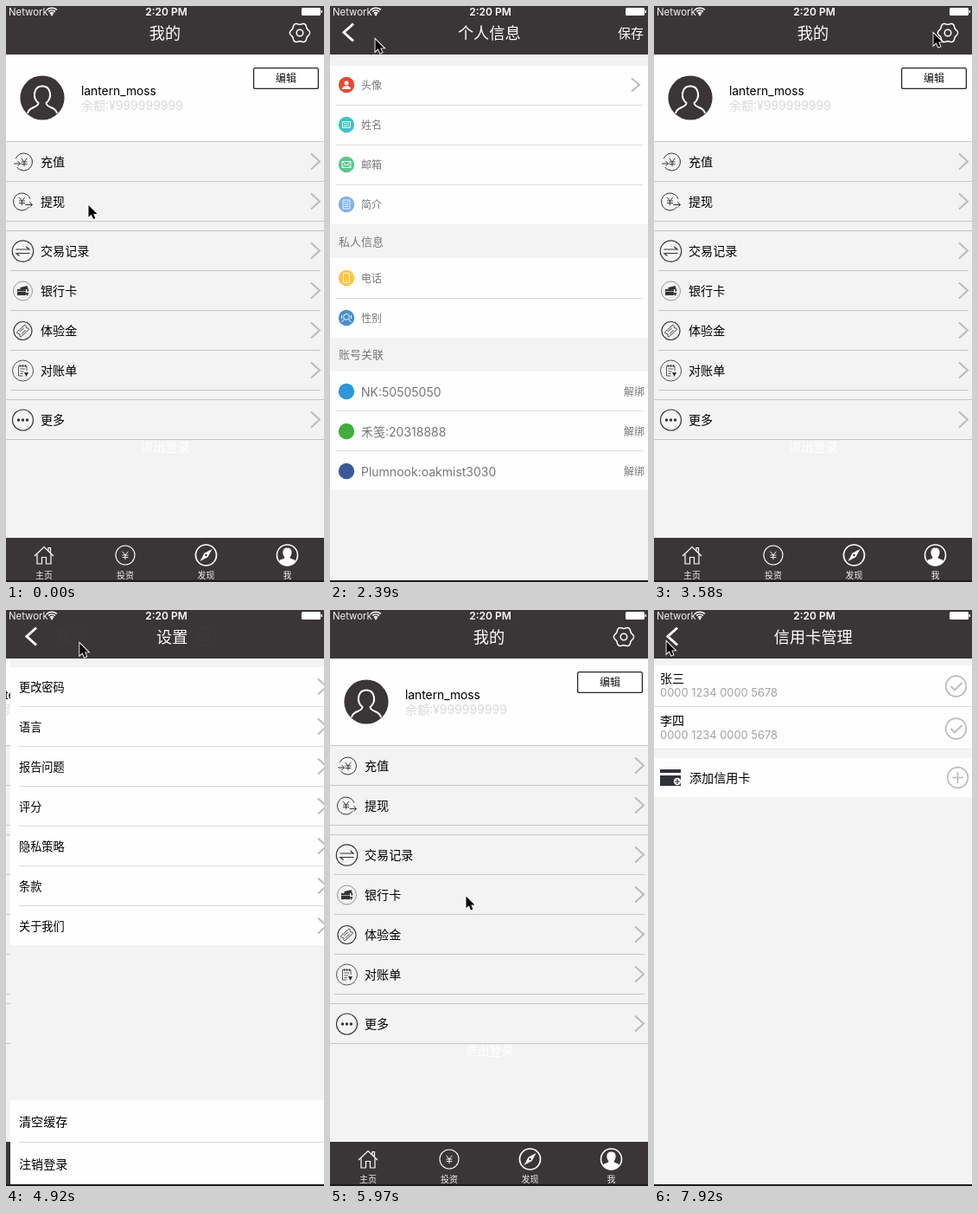
Write an HTML page with a canvas that moves like this. It is 368x665 px and loops after 8000 ms.

```html
<!DOCTYPE html>
<html lang="zh-CN">
<head>
<meta charset="utf-8">
<title>账户页面演示</title>
<style>
html, body { margin: 0; width: 100%; height: 100%; overflow: hidden; background: #f3f3f3; }
canvas { display: block; width: 368px; height: 665px; }
</style>
</head>
<body>
<canvas id="stage"></canvas>
<script>
const W = 368, H = 665, LOOP = 8000;
const DARK = '#3a3536', GREY = '#f3f3f3', ARROW = '#bbb';
const FONT = 'Inter, "Noto Sans CJK SC", "Noto Sans CJK", sans-serif';
const canvas = document.getElementById('stage');
const ctx = canvas.getContext('2d');
const ratio = window.devicePixelRatio || 1;
canvas.width = W * ratio;
canvas.height = H * ratio;

function rect(x, y, w, h, color) {
  ctx.fillStyle = color;
  ctx.fillRect(x, y, w, h);
}
function rule(x1, x2, y, color = '#c6c6c6') { rect(x1, y, x2 - x1, 1, color); }
function line(d, color, width = 1) {
  ctx.strokeStyle = color;
  ctx.lineWidth = width;
  ctx.stroke(new Path2D(d));
}
function fill(d, color) {
  ctx.fillStyle = color;
  ctx.fill(new Path2D(d));
}
function disc(x, y, r, color) {
  ctx.beginPath();
  ctx.arc(x, y, r, 0, 7);
  ctx.fillStyle = color;
  ctx.fill();
}
function ring(x, y, r, color, width = 1, from = 0, to = Math.PI * 2) {
  ctx.beginPath();
  ctx.arc(x, y, r, from, to);
  ctx.strokeStyle = color;
  ctx.lineWidth = width;
  ctx.stroke();
}
// y is the middle of the glyphs
function text(s, x, y, size, color, align = 'left', weight = 400) {
  ctx.font = `${weight} ${size}px ${FONT}`;
  ctx.textAlign = align;
  ctx.fillStyle = color;
  ctx.fillText(s, x, y + size * 0.37);
}
function at(x, y, draw) {
  ctx.save();
  ctx.translate(x, y);
  draw();
  ctx.restore();
}
function chevron(x, y, w = 11, h = 9) {
  line(`M${x + 1} ${y - h}L${x + w} ${y}L${x + 1} ${y + h}`, ARROW, 2);
}
function yen(color, s = 1) {
  ctx.save();
  ctx.scale(s, s);
  line('M-4 -5L0 0L4 -5M0 0V6M-4 0H4M-4 3H4', color, 1.1);
  ctx.restore();
}

const INK = '#333';
const homeRows = [
  ['充值', 180, () => {
    ring(1, 0, 10, INK, 1, -2.75, 2.5);
    at(1.5, 0, () => yen(INK, 0.85));
    line('M-10.5 2H-3M-6 -1L-3 2L-6 5', INK);
  }],
  ['提现', 226, () => {
    ring(-1, 0, 10, INK, 1, 0.65, 5.95);
    at(-1, -1, () => yen(INK, 0.85));
    line('M3 3.5H11M8 0.5L11 3.5L8 6.5', INK);
  }],
  ['交易记录', 283, () => {
    ring(0, 0, 12.2, INK, 1.2);
    line('M-8 -2H7.5L4 -5M8 2.5H-7.5L-4 5.5', INK, 1.2);
  }],
  ['银行卡', 329, () => {
    ring(0, 0, 11, '#888', 0.9);
    fill('M-3 -4L5 -6L7 0L5 1V-2H-3Z', INK);
    rect(-6.5, -2, 10, 7, INK);
    rule(-6.5, 3.5, 0, '#aaa');
    fill('M3 2H7L5 6Z', INK);
  }],
  ['体验金', 375, () => {
    ring(0, 0, 10.5, INK, 1.1);
    ctx.rotate(-0.75);
    line('M-6.5 -3.5H6.5V-1.2A1.2 1.2 0 0 0 6.5 1.2V3.5H-6.5V1.2A1.2 1.2 0 0 0 -6.5 -1.2ZM-3 -1.5H3M-3 1.5H3', INK, 0.9);
  }],
  ['对账单', 421, () => {
    ring(0, 0, 12, '#555', 1);
    line('M4.5 0V-5.5H-5V6H0M-3 -7V-4M0 -7V-4M3 -7V-4M-3 -2H2.5M-3 1H1M-3 3.5H0', '#444', 0.9);
    fill('M1.5 2H6.5L4 7Z', INK);
  }],
  ['更多', 478, () => {
    ring(0, 0, 12, INK, 1.2);
    for (const x of [-5, 0, 5]) disc(x, 0, 1.7, INK);
  }]
];
const tabs = [
  ['主页', 44, () => line('M-11 1L0 -9.5L11 1M5 -5V-8.5H7.5V-2.5M-8 -1V10H-2.5V2.5H2.5V10H8V-1', '#fff', 1.2)],
  ['投资', 138, () => { ring(0, 0, 11, '#fff', 1.1); yen('#fff', 0.85); }],
  ['发现', 231.5, () => {
    ring(0, 0, 12, '#fff', 1.7);
    fill('M7 -7L2 2.2L-7 7L-2 -2.2Z', '#fff');
    disc(0, 0, 1.3, DARK);
  }],
  ['我', 325.5, () => {
    ring(0, 0, 12, '#fff', 1.6);
    fill('M0 -8.5C7 -8.5 5.5 0 3 2.5C3 5 9 4 9.5 7.5A12 12 0 0 1 -9.5 7.5C-9 4 -3 5 -3 2.5C-5.5 0 -7 -8.5 0 -8.5Z', '#fff');
  }]
];

function home(t) {
  rect(0, 56, W, H - 56, GREY);
  rect(0, 56, W, 100, '#fefefe');
  disc(42, 106, 25.6, DARK);
  at(42, 106, () => line('M-17 18C-16 10 -5 12 -4.5 6C-12 0 -10 -13.5 0 -13.5S12 0 4.5 6C5 12 16 10 17 18', '#fff', 2));
  text('lantern_moss', 87, 97.5, 13.8, '#000');
  text('余额:¥999999999', 87, 114.5, 14, '#d9d9d9');

  const pressed = t >= 1635 && t < 1935;
  ctx.beginPath();
  ctx.roundRect(286.6, 71.6, 74.8, 23.8, 2);
  ctx.fillStyle = pressed ? '#c4c4c4' : '#fff';
  ctx.fill();
  ctx.strokeStyle = '#25252f';
  ctx.lineWidth = 1.3;
  ctx.stroke();
  text('编辑', 324, 84, 12, '#111', 'center', 500);

  for (const y of [156, 202, 248, 259, 454, 500]) rule(0, W, y);
  for (const y of [305, 351, 397, 443]) rule(5, 364, y);
  for (const [label, y, icon] of homeRows) {
    at(19.5, y, icon);
    text(label, 40, y, 14.1, '#000');
    chevron(352, y - 0.5);
  }
  text('退出登录', 184.5, 508.5, 14, '#fff', 'center');

  rect(0, 614, W, 51, DARK);
  for (const [label, x, icon] of tabs) {
    at(x, 634, icon);
    text(label, x, 657, 10, '#f2f2f2', 'center');
  }
}
function homeBar() {
  text('我的', 184, 31, 18.2, '#fff', 'center');
  ctx.beginPath();
  for (let i = 0; i <= 72; i++) {
    const a = i * Math.PI / 36, r = 10.6 + Math.cos(6 * a);
    ctx.lineTo(340 + r * Math.cos(a), 31 + r * Math.sin(a));
  }
  ctx.strokeStyle = '#fff';
  ctx.lineWidth = 1.5;
  ctx.stroke();
  ring(340, 31, 3.8, '#fff', 1.5);
}

const profileRows = [
  ['头像', 91, '#e6492f', () => { disc(0, -2, 2.5, '#fff'); fill('M-5 5C-5 0 5 0 5 5Z', '#fff'); }],
  ['姓名', 137, '#43c0c6', () => line('M-4.5 -3.5H4.5V3.5H-4.5ZM-3 -1.3H3M-3 1.3H3', '#fff', 0.9)],
  ['邮箱', 183, '#5bc48c', () => line('M-5 -3.5H5V3.5H-5ZL0 1L5 -3.5M-5 3.5L-1.5 0M5 3.5L1.5 0', '#fff', 0.9)],
  ['简介', 229, '#7fafe9', () => line('M-4 -5H4V5H-4ZM-2.5 -2.5H0M-2.5 0H2.5M-2.5 2.5H2.5M1.5 -3.5V-1.5', '#fff', 0.9)],
  ['电话', 314, '#fcc44c', () => line('M-3.5 -5.5H3.5V5.5H-3.5ZM-1 4H1', '#fff', 0.9)],
  ['性别', 360, '#4a8fcc', () => { ring(0, -1, 3.4, '#fff', 0.9); line('M-5.5 5L-2.5 1.5M5.5 5L2.5 1.5M-5.5 -3V1M5.5 -3V1', '#fff', 0.9); }],
  ['NK:50505050', 445, '#2e97d7'],
  ['禾笺:20318888', 491, '#40ad3c'],
  ['Plumnook:oakmist3030', 537, '#3b5998']
];
function profile() {
  rect(-3, 56, W + 3, H - 56, GREY);
  for (const [y, h] of [[69, 183], [291, 92], [422, 137]]) rect(-3, y, W + 3, h, '#fefefe');
  for (const y of [114, 160, 206, 337, 467, 513]) rule(7, 362, y, '#dcdcdc');
  text('私人信息', 10, 272, 13, '#777');
  text('账号关联', 10, 402.5, 13, '#777');
  for (const [label, y, color, icon] of profileRows) {
    disc(19, y, 9.2, color);
    if (icon) at(19, y, icon);
    text(label, 36, y + 0.5, icon ? 12 : 14, '#777');
    if (!icon) text('解绑', 364, y + 0.5, 12, '#777', 'right');
  }
  chevron(348, 91, 10, 7.5);
}

function settings() {
  rect(-3, 56, W + 3, H - 56, GREY);
  rect(-3, 66, W + 3, 321, '#fefefe');
  rect(-3, 566, W + 3, 99, '#fefefe');
  ['更改密码', '语言', '报告问题', '评分', '隐私策略', '条款', '关于我们'].forEach((label, i) => {
    const y = 89 + 46 * i;
    text(label, 7, y, 13.2, '#000');
    chevron(352, y - 0.5);
    if (i < 6) rule(7, W, y + 22, '#dcdcdc');
  });
  text('清空缓存', 7, 591, 14.1, '#000');
  rule(7, W, 614, '#dcdcdc');
  text('注销登录', 7, 640, 14.1, '#000');
}

function cards() {
  rect(-3, 56, W + 3, H - 56, '#f4f4f4');
  rect(-3, 64, W + 3, 96, '#fefefe');
  rect(-3, 171, W + 3, 45, '#fefefe');
  rule(0, W, 111, '#dedede');
  rule(0, W, 160, '#e4e4e4');
  [['张三', 79], ['李四', 128]].forEach(([name, y]) => {
    text(name, 7, y, 14, '#000');
    text('0000 1234 0000 5678', 7, y + 16.5, 12.9, '#a2a2a2');
    ring(349.5, y + 9, 11.8, ARROW, 1.7);
    line(`M343.5 ${y + 9}l4.5 4.5l8.5 -8.5`, ARROW, 1.8);
  });
  rect(7, 184, 24, 19, '#2f323a');
  rect(7, 188, 24, 3, '#fefefe');
  disc(27, 198, 4.2, '#fff');
  line('M24 198H30M27 195V201', '#2f323a', 1.2);
  text('添加信用卡', 41, 194, 14.1, '#000');
  ring(351.5, 193.5, 11.8, ARROW, 1.7);
  line('M345 193.5H358M351.5 187V200', ARROW, 1.7);
}

function pageBar(visit) {
  line('M27 20.5L16 30.5L27 40.5', '#fff', 3);
  text(visit.title, 184.3, 31, 18.2, '#fff', 'center');
  if (visit.action) text(visit.action, 348, 31, 15, '#fff', 'center');
}

function statusBar() {
  text('Network', 3, 6.5, 11.4, '#f4f4f4');
  text('2:20 PM', 185.5, 6.5, 12, '#fff', 'center', 600);
  for (const r of [3.2, 6, 8.8]) ring(53, 11, r, '#fff', 1.6, -2.3, -0.84);
  disc(53, 10, 1.3, '#fff');
  ctx.beginPath();
  ctx.roundRect(342, 2, 22, 9, 1.5);
  ctx.fillStyle = '#fff';
  ctx.fill();
  rect(364.6, 5, 1.4, 3, '#fff');
}

// Each visit pushes a page over the home page and later pops it
const visits = [
  { from: 1860, to: 2900, page: profile, title: '个人信息', action: '保存' },
  { from: 4562, to: 5130, page: settings, title: '设置' },
  { from: 7260, to: 9000, page: cards, title: '信用卡管理' }
];
function settle(ms) {
  const x = ms * 0.016;
  return ms > 500 ? 0 : W * (1 + x) * Math.exp(-x);
}

// Moments when the screen refreshes: first, last, count
const bursts = [
  [140, 590, 4], [890, 1790, 7], [1940, 2840, 7], [2990, 3580, 5],
  [4030, 5070, 8], [5220, 6120, 7], [6270, 6870, 5], [7320, 7920, 5]
];
function refreshTime(t) {
  let last = 0;
  for (const [a, b, n] of bursts) {
    if (t < a) break;
    const step = (b - a) / (n - 1);
    last = a + step * Math.min(n - 1, Math.floor((t - a + 5) / step));
  }
  return last;
}

const pointer = [
  [0, 95, 229.5], [590, 97, 288], [740, 97, 288], [1340, 299, 83], [1790, 314, 81],
  [1940, 300, 78], [2390, 52, 38], [2540, 18, 34], [2990, 16, 30], [3440, 316, 36],
  [3580, 323, 31], [3880, 323, 31], [4180, 337, 30], [4480, 337, 30], [4921, 85, 38],
  [5070, 20, 32], [5220, 18, 30], [5970, 157, 330], [6120, 134, 336], [6570, 112, 296],
  [6870, 115, 318], [7320, 115, 318], [7920, 14, 36], [8000, 14, 36]
];
function cursor(t) {
  const i = Math.max(1, pointer.findIndex(k => k[0] >= t));
  const [t0, x0, y0] = pointer[i - 1], [t1, x1, y1] = pointer[i];
  const p = (t - t0) / (t1 - t0);
  at(x0 + (x1 - x0) * p, y0 + (y1 - y0) * p, () => {
    const d = 'M0.5 0.5V14.3L3.7 11.3L6 16.5L8.4 15.5L6.2 10.4H10.5Z';
    line(d, '#fff', 1.8);
    fill(d, '#000');
  });
}

function draw(t) {
  ctx.setTransform(ratio, 0, 0, ratio, 0, 0);
  const visit = visits.find(v => t >= v.from && t < v.to + 500);
  const off = !visit ? W : Math.round(t < visit.to ? settle(t - visit.from) : W - settle(t - visit.to));
  const back = -0.3 * (W - off);

  rect(0, 0, W, H, GREY);
  at(back, 0, () => home(t));
  if (off < W) at(off, 0, visit.page);

  rect(0, 0, W, 56, DARK);
  ctx.globalAlpha = off / W;
  at(back, 0, homeBar);
  ctx.globalAlpha = 1 - off / W;
  if (off < W) at(off, 0, () => pageBar(visit));
  ctx.globalAlpha = 1;

  statusBar();
  rect(0, 663, W, 2, '#1e1b1c');
  cursor(t);
}

function tick() {
  draw(refreshTime(performance.now() % LOOP));
  requestAnimationFrame(tick);
}
tick();
</script>
</body>
</html>
```
